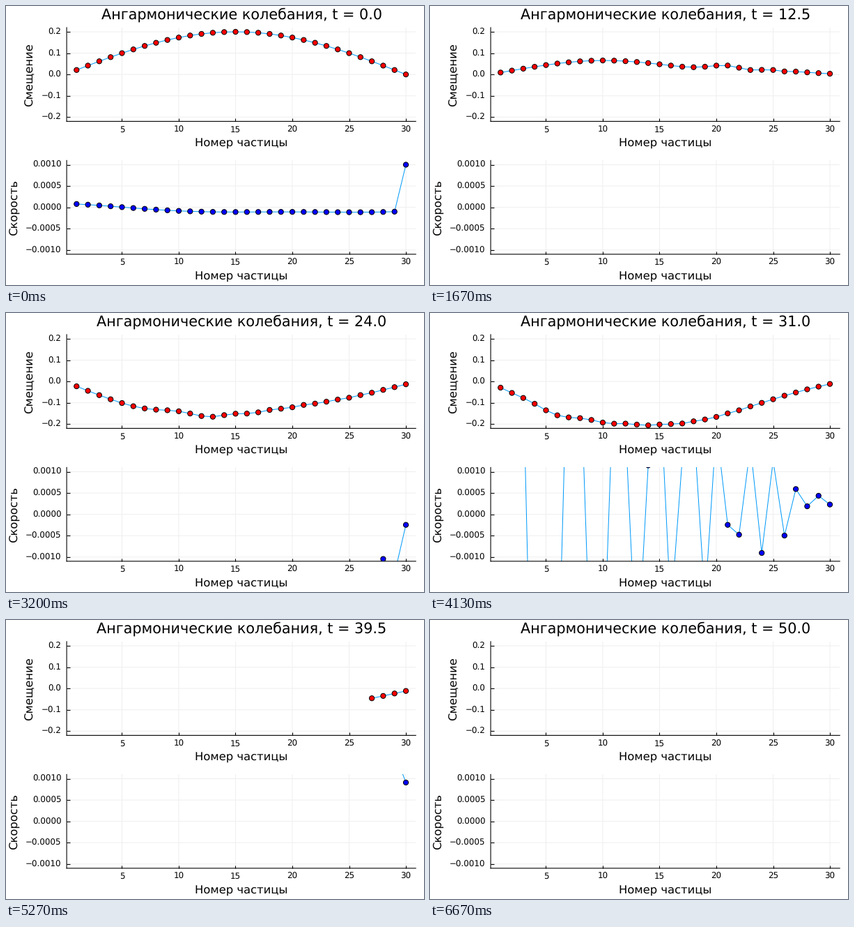
A matplotlib script for the animation above (6740 ms loop, 600 by 400 pixels).

```python
import numpy as np
import matplotlib.pyplot as plt
from matplotlib.animation import FuncAnimation

W, H, DPI = 600, 400, 100
PX = 72 / DPI                      # points per pixel
N, DT, BETA = 30, 0.05, 100.0      # chain of particles
SHOTS, STRIDE, FPS = 101, 10, 15   # snapshots, steps between them, pace
LOOP, TICK_MS = 6740, 20
LEFT, RIGHT = 87.1, 588.2
TITLE, LABEL, TICK = 20.8 * PX, 16.34 * PX, 11.89 * PX

plt.rcParams.update({
    "font.family": "DejaVu Sans",
    "text.hinting": "no_hinting",
    "path.snap": False,
})


def simulate():
    """Anharmonic chain with walls at both ends, sampled every STRIDE steps."""
    i = np.arange(1, N + 1)
    x = 0.2 * np.sin(np.pi * i / N)
    v = np.zeros(N)
    shots = []
    with np.errstate(all="ignore"):
        for step in range((SHOTS - 1) * STRIDE + 1):
            d = np.diff(np.concatenate(([0.0], x, [0.0])))
            force = d[1:] - d[:-1] + BETA * (d[1:] ** 3 + d[:-1] ** 3)
            v = v + force * DT
            x = x + v * DT
            if step % STRIDE == 0:
                shots.append((drawable(x), drawable(v)))
    return shots


def drawable(y):
    """Blank out values that have blown up."""
    return np.where(np.abs(y) < 1e6, y, np.nan)


def text(x, y, s, size, **kw):
    kw.setdefault("ha", "center")
    kw.setdefault("va", "baseline")
    return fig.text(x / W, 1 - y / H, s, fontsize=size, color="black", **kw)


class Panel:
    """One chart centred on pixel row mid."""

    def __init__(self, mid, limit, ticks, fmt, name, name_x, color):
        half = 67.25
        bottom = mid + half
        ax = fig.add_axes([LEFT / W, 1 - bottom / H,
                           (RIGHT - LEFT) / W, 2 * half / H])
        ax.set_xlim(0.13, 30.87)
        ax.set_ylim(-limit, limit)
        ax.set_axisbelow(True)
        ax.grid(True, color="#efefef", lw=PX)
        ax.spines[["top", "right"]].set_visible(False)
        ax.spines[["left", "bottom"]].set_linewidth(1.1 * PX)
        ax.set_xticks(range(5, 31, 5))
        ax.set_yticks(ticks)
        ax.tick_params(direction="in", length=4.5 * PX, width=1.1 * PX,
                       labelleft=False, labelbottom=False)

        for k in range(5, 31, 5):
            px = LEFT + (k - 0.13) / 30.74 * (RIGHT - LEFT)
            text(px, bottom + 15.2, str(k), TICK)
        for t in ticks:
            label = fmt.format(t).replace("-", "\u2212")
            text(79.6, mid - t / limit * half + 3.8, label, TICK, ha="right")
        text((LEFT + RIGHT) / 2, bottom + 36.6, "Номер частицы", LABEL)
        text(name_x, mid, name, LABEL, rotation=90, ha="right", va="center")

        self.line, = ax.plot([], [], color="#009afa", lw=PX)
        # per-point colours keep the dots at sub-pixel positions
        self.dots = ax.scatter(index, 0 * index, s=(7.2 * PX) ** 2, lw=PX,
                               c=[color] * N, edgecolors=["black"] * N, zorder=3)

    def show(self, y):
        self.line.set_data(index, y)
        self.dots.set_offsets(np.column_stack((index, y)))


index = np.arange(1, N + 1)
shots = simulate()
fig = plt.figure(figsize=(W / DPI, H / DPI), dpi=DPI, facecolor="white")
shift = Panel(98.15, 0.22, [-0.2, -0.1, 0.0, 0.1, 0.2], "{:.1f}",
              "Смещение", 42.2, "red")
speed = Panel(288.65, 0.0011, [-0.001, -0.0005, 0.0, 0.0005, 0.001], "{:.4f}",
              "Скорость", 19.6, "blue")
title = text((LEFT + RIGHT) / 2 + 0.4, 18.4, "", TITLE)


def draw(n):
    # a snapshot starts at the nearest tick to its 1/15 s mark
    k = min(int((n + 0.75) * TICK_MS * FPS / 1000), SHOTS - 1)
    x, v = shots[k]
    shift.show(x)
    speed.show(v)
    title.set_text(f"Ангармонические колебания, t = {k * DT * STRIDE:.1f}")
    return shift.line, shift.dots, speed.line, speed.dots, title


anim = FuncAnimation(fig, draw, frames=LOOP // TICK_MS, init_func=lambda: draw(0),
                     interval=TICK_MS, repeat=True, repeat_delay=0)
plt.show()
```
